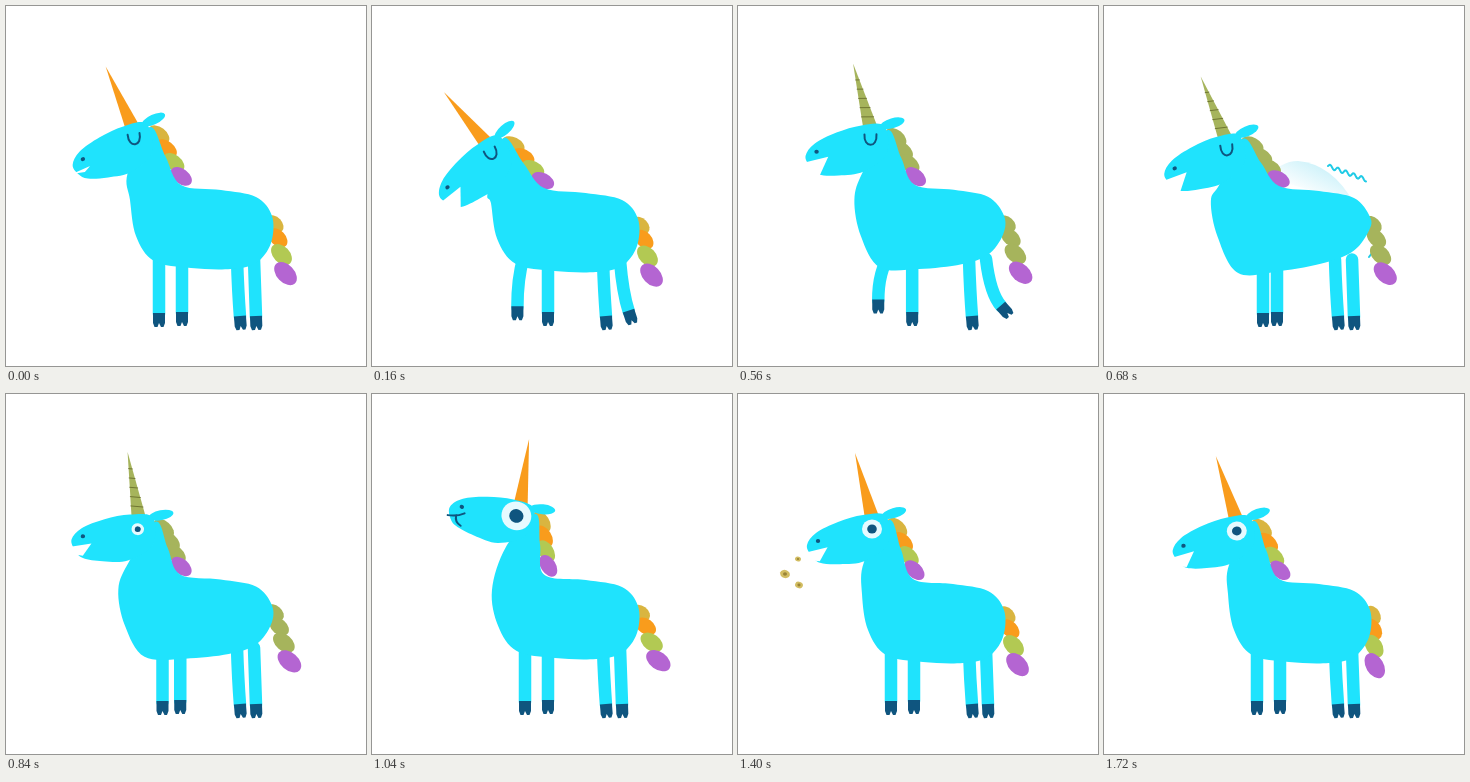
These frames come from a looping animation (360 px wide and 360 px high, 1.76 s). An HTML page:

```html
<!DOCTYPE html>
<html lang="en">
<head>
<meta charset="utf-8">
<title>Unicorn</title>
<style>
html, body { margin: 0; width: 100%; height: 100%; overflow: hidden; background: #fff; }
svg { display: block; width: 100vw; height: 100vh; }
</style>
</head>
<body>
<svg id="stage" viewBox="0 0 360 360"></svg>
<script>
const LOOP = 1760, STEP = 40;
const SKIN = '#1fe3fd', DARK = '#0f557f', SPRAY = '#20cbe6', MOSS = '#a6b45c';
const LOCKS = ['#d9b540', '#f99c1c', '#b2c953', '#b465d2'];

// x, y, turn: head; open: mouth; eye: open radius; lean, bob, puff: body; step: raised legs; swing: tail
const rest = { open: 0, eye: 0, lean: 0, bob: 0, puff: 0, step: 0, swing: 12 };
const poses = [
  { at: 0, x: 126, y: 118, turn: -9, bob: -6 },
  { at: 160, x: 113, y: 134, turn: -25, open: 1, lean: -5, bob: -3, step: 0.2 },
  { at: 400, x: 150, y: 102, turn: 10, open: 1, lean: 7, bob: -8, step: 1, swing: 18 },
  { at: 680, x: 121, y: 129, turn: -7, open: 0.9, bob: -5, puff: 1, swing: 14 },
  { at: 1040, x: 150, y: 108, turn: 22, eye: 15, lean: -4, bob: -4, swing: 20 },
  { at: 1400, x: 134, y: 120, turn: 0, open: 0.6, eye: 10 },
  { at: 1720, x: 132, y: 122, turn: -3, open: 0.7, eye: 10, swing: 2 }
].map(p => ({ ...rest, ...p }));

// Trunk outline from chest, under the belly, over the rump to the withers
const trunk = [[124, 200], [130, 236], [148, 261], [185, 268], [225, 269], [250, 263],
  [265, 243], [266, 216], [250, 197], [215, 190], [175, 185]];

const stage = document.getElementById('stage');
const mix = (a, b, k) => a + (b - a) * k;
const mixPt = (a, b, k) => a.map((v, i) => mix(v, b[i], k));
const within = (t, from, to) => t >= from && t < to;
const rad = deg => deg * Math.PI / 180;
const path = (d, fill, extra = '') => `<path d="${d}" fill="${fill}" ${extra}/>`;
const line = (d, color, w) => path(d, 'none', `stroke="${color}" stroke-width="${w}" stroke-linecap="round" stroke-linejoin="round"`);
const poly = (pts, fill) => path(`M${pts.join(' ')}Z`, fill);
const oval = ([x, y], rx, ry, fill, turn = 0) =>
  `<ellipse rx="${rx}" ry="${ry}" fill="${fill}" transform="translate(${x} ${y}) rotate(${turn})"/>`;

// Closed smooth curve through the points
function blob(pts, fill) {
  const n = pts.length, at = i => pts[(i + n) % n];
  const ctrl = (p, a, b) => p.map((v, c) => v + (b[c] - a[c]) / 6);
  const d = pts.map((p, i) =>
    `C${ctrl(p, at(i - 1), at(i + 1))} ${ctrl(at(i + 1), at(i + 2), p)} ${at(i + 1)}`);
  return path(`M${pts[0]}${d.join('')}Z`, fill);
}

function poseAt(t) {
  const i = poses.findLastIndex(p => p.at <= t);
  const a = poses[i], b = poses[(i + 1) % poses.length];
  const k = (t - a.at) / ((b.at || LOOP) - a.at);
  const now = {};
  for (const key in a) now[key] = mix(a[key], b[key], k * k * (3 - 2 * k));
  return now;
}

// Head coordinates to stage coordinates
function fromHead(p, x, y) {
  const c = Math.cos(rad(p.turn)), s = Math.sin(rad(p.turn));
  return [p.x + x * c - y * s, p.y + x * s + y * c];
}

function spine(p) {
  const body = trunk.map(([x, y]) => {
    const front = Math.max(0, (250 - x) / 125);
    const low = y > 240 ? 1 : 0, shift = y > 195 ? 17 * p.puff : 0;
    return [x + (p.lean - shift) * front, y + p.bob + low * p.puff * 30 * (front - 0.45)];
  });
  const withers = body[body.length - 1], poll = fromHead(p, 17, 6);
  const throat = fromHead(p, -8 + 0.45 * p.turn, 48);
  return { poll, withers, outline: [throat, ...body, mixPt(poll, withers, 0.5), poll] };
}

function mane({ poll, withers }, colors) {
  const turn = Math.atan2(withers[1] - poll[1], withers[0] - poll[0]) * 180 / Math.PI;
  return colors.map((color, i) => {
    const [x, y] = mixPt(poll, withers, 0.13 + 0.24 * i);
    return oval([x + 5, y], 12, 7.5, color, turn - 24);
  }).join('');
}

function tail(p, colors) {
  return colors.map((color, i) => {
    const d = 13 * i + 1.3 * i * i;
    const at = [269 + d * Math.sin(rad(p.swing)), 221 + p.bob / 2 + d * Math.cos(rad(p.swing))];
    return oval(at, 10 + 1.2 * i, 7 + 0.6 * i, color, 62 - 1.3 * p.swing);
  }).join('');
}

function leg(hip, knee, foot) {
  const turn = Math.atan2(foot[1] - knee[1], foot[0] - knee[0]) * 180 / Math.PI - 90;
  return line(`M${hip}Q${knee} ${foot}`, SKIN, 12.5)
    + path('M-6-1H6L6 9 4.5 13 2 13 0 9-1.5 13-4.5 13-6 9Z', DARK,
      `transform="translate(${foot}) rotate(${turn})"`);
}

function legs(p) {
  const hip = 256 + p.bob / 2;
  const straight = (x, y) => leg([x, hip], [x, 285], [x, y]);
  const bend = (a, b) => mixPt(a, b, p.step);
  const x = 153 + 6 * p.puff;
  return leg(bend([x, hip], [145, 242]), bend([x, 280], [115, 242]), bend([x, 308], [115, 274]))
    + straight(176 - 3 * p.puff, 307)
    + leg([231, hip], [232, 285], [234, 311])
    + leg([248, hip], bend([249, 285], [257, 292]), bend([250, 311], [284, 284]));
}

function horn(color, stripes) {
  const tip = [-17, -61], left = [-7, 5], right = [8, 5];
  let out = poly([tip, left, right], color);
  for (let k = 0.25; stripes && k < 0.9; k += 0.14)
    out += line(`M${mixPt(tip, left, k)}L${mixPt(tip, right, k)}`, stripes, 0.8);
  return out;
}

function eye(r) {
  if (r < 6) return line('M-6 10c-1 14 13 14 12 0', DARK, 2);
  return oval([0, 15], r, r * 0.95, '#e6faff') + oval([0, 15], r * 0.48, r * 0.45, DARK);
}

function head(p, lips, hornColor, stripes) {
  const o = p.open;
  const mouth = lips
    ? line('M-64 40Q-55 38-49 32M-56 37Q-55 44-48 45', DARK, 2)
    : poly([[-67, 40 - 2 * o], [-48 + 6 * o, 35 - 3 * o], [-54 + 3 * o, 40 + 12 * o], [-64, 40 + 10 * o]], '#fff');
  return `<g transform="translate(${p.x} ${p.y}) rotate(${p.turn})">`
    + horn(hornColor, stripes)
    + oval([22, -1], 12.5, 5, SKIN, -16)
    + blob([[14, 2], [-9, 1], [-34, 8], [-56, 19], [-65, 31], [-61, 41],
      [-52, 47 + 3 * o], [-32, 49 + 2 * o], [-7, 47], [16, 30]], SKIN)
    + mouth + oval([-54, 27], 2.2, 2, DARK) + eye(p.eye) + '</g>';
}

function shiver() {
  let wave = 'M224 160';
  for (let x = 1; x <= 38; x++) wave += `L${224 + x} ${160 + x * 0.36 + 2 * Math.sin(x * 0.8 + 3)}`;
  return path('M165 172Q176 155 194 155Q228 158 250 197Z', 'url(#haze)')
    + line(wave, SPRAY, 2) + line('M265 251l3-4M272 249l2-5', SPRAY, 2);
}

// Three bits fly out of the mouth
function crumbs(t) {
  const k = (t - 1280) / 120;
  if (k <= 0 || k > 1.5) return '';
  return [[-28, 20, 5], [-14, 31, 4], [-15, 5, 3]].map(([dx, dy, r]) => {
    const at = [75 + dx * k, 160 + dy * k];
    return oval(at, r, r * 0.8, '#d2bd62', 20) + oval(at, r * 0.4, r * 0.35, '#9a8437');
  }).join('');
}

function draw(t) {
  const p = poseAt(t), back = spine(p);
  const mossy = within(t, 560, 880), pale = within(t, 320, 560);
  const colors = LOCKS.map((c, i) => i < 3 ? (mossy ? MOSS : c) : (pale ? '#c3d3e3' : c));
  const stripes = mossy ? '#666a2a' : pale && '#d97612';
  stage.innerHTML =
    '<defs><linearGradient id="haze" x1="0" y1="1" x2="1" y2="0"><stop offset=".3" stop-color="#fff"/><stop offset="1" stop-color="#b4ebf7"/></linearGradient></defs>'
    + (within(t, 600, 760) ? shiver() : '')
    + tail(p, colors) + mane(back, colors) + legs(p)
    + blob(back.outline, SKIN)
    + head(p, within(t, 920, 1240), mossy ? MOSS : LOCKS[1], stripes)
    + crumbs(t);
}

const start = performance.now();
let shown = -1;
function tick() {
  const t = Math.floor(((performance.now() - start) % LOOP) / STEP) * STEP;
  if (t !== shown) draw(shown = t);
  requestAnimationFrame(tick);
}
tick();
</script>
</body>
</html>
```
